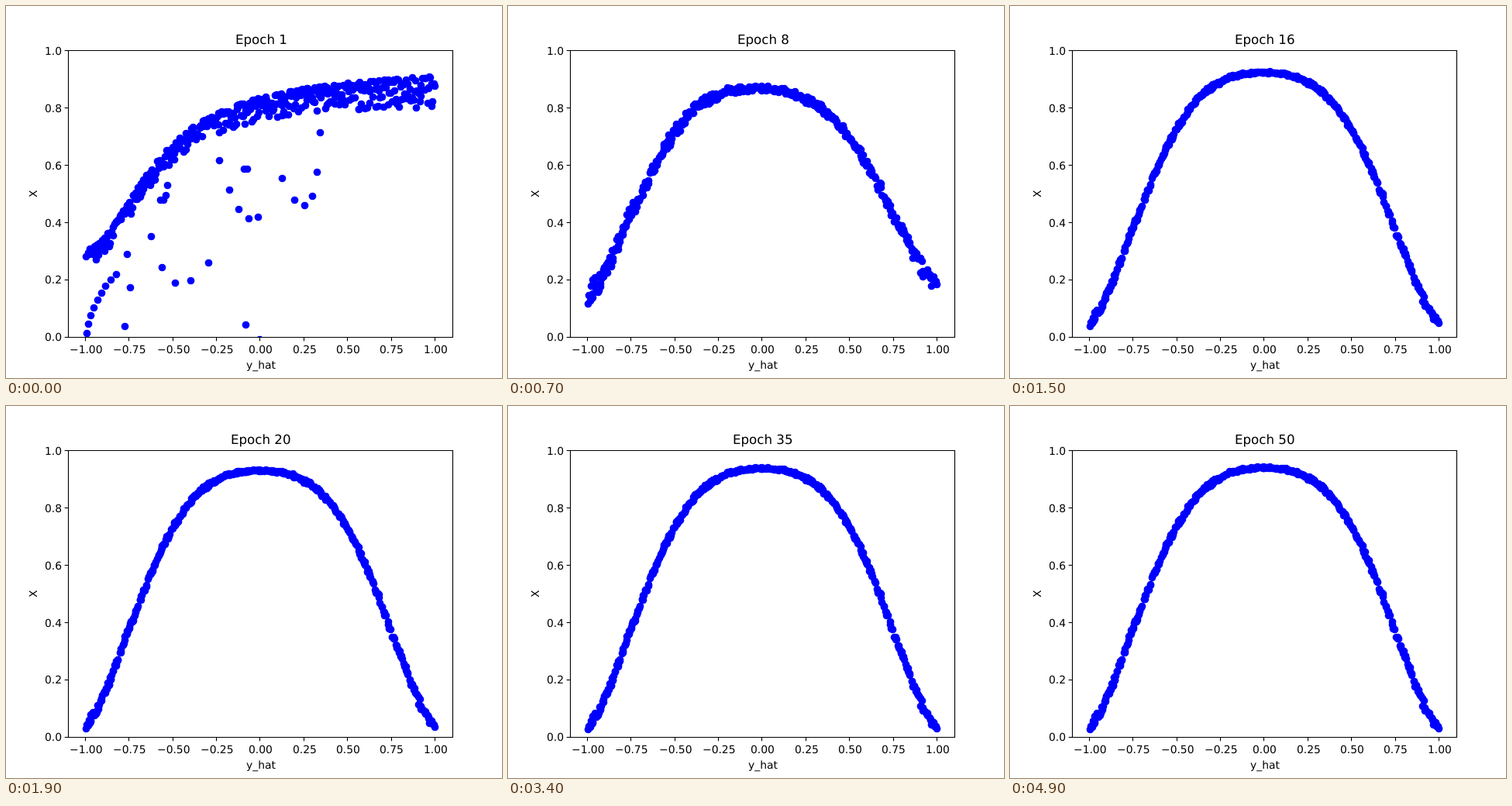
Write an HTML page that moves like this. It is 640 by 480 pixels and loops after 5 s.

```html
<!DOCTYPE html>
<html lang="en">
<head>
<meta charset="utf-8">
<title>Training epochs</title>
<style>
html, body { margin: 0; width: 100%; height: 100%; overflow: hidden; background: #fff; }
svg { display: block; width: 640px; height: 480px; }
text {
  font-family: "DejaVu Sans", sans-serif; font-size: 13.89px; fill: #000;
  text-rendering: geometricPrecision;
}
#title { font-size: 16.67px; }
#axes { stroke: #000; stroke-width: 1.11; fill: none; }
</style>
</head>
<body>
<svg viewBox="0 0 640 480">
  <clipPath id="plot"><rect x="80" y="57.6" width="496" height="369.6"/></clipPath>
  <rect width="640" height="480" fill="#fff"/>
  <g id="dots" fill="#00f" clip-path="url(#plot)"></g>
  <g id="axes"><path d="M80.5 57.5H576.5V427.5H80.5Z"/></g>
  <g id="labels"><text transform="translate(40 247) rotate(-90)">X</text></g>
  <text id="title" y="49"></text>
</svg>
<script>
const EPOCHS = 50, STEP = 100, COUNT = 400;
const byId = id => document.getElementById(id);
const toX = x => 327.8 + 225.6 * x;
const toY = v => 427.2 - 369.6 * v;
const fromX = px => (px - 327.8) / 225.6;
const fromY = py => (427.2 - py) / 369.6;
const snap = v => Math.floor(v) + .5;
const mix = (a, b, t) => a + (b - a) * t;

let seed = 20731;
function random() {
  seed = (seed * 1664525 + 1013904223) % 4294967296;
  return seed / 4294967296;
}

// The fit goes from a saturating ramp over a lopsided hill to a bell
const ramp = x => .88 - .6 / (1 + ((x + 1) / .41) ** 2);

function hill(x) {
  const d = x + .1;
  return .765 / (1 + (d < 0 ? (-d / .82) ** 3.2 : (d / 1.36) ** 2));
}

const bell = x => Math.cos(Math.PI / 2 * (.35 * Math.abs(x) + .54 * x * x)) ** 2;

const warmUp = epoch => Math.min((epoch - 1) / 3, 1);
const settle = epoch => 1 - Math.exp(-.26 * Math.max(epoch - 4, 0));

function curve(x, epoch) {
  const early = mix(ramp(x), hill(x), warmUp(epoch));
  const height = .942 - .02 * Math.exp((4 - epoch) / 22);
  return mix(early, height * bell(x), settle(epoch));
}

function spread(x, epoch) {
  const early = mix(.08 + .03 * x, .045 - .03 * x + .09 * x * x, warmUp(epoch));
  return mix(early, .005 + .018 * Math.abs(x), Math.min(1, settle(epoch) * 1.12));
}

function add(parent, name, attrs) {
  const el = document.createElementNS("http://www.w3.org/2000/svg", name);
  for (const key in attrs) el.setAttribute(key, attrs[key]);
  return byId(parent).appendChild(el);
}

const dots = [];
function addDot(x, skewed, even, offset) {
  const el = add("dots", "circle", { cx: snap(toX(x)), r: 4.86 });
  dots.push({ el, x, skewed, even, offset });
}

for (let i = 0; i < COUNT; i++) {
  const x = Math.min(1, -.995 + 1.995 * (i + 2 * random()) / COUNT);
  addDot(x, .5 - random() ** 1.6, (random() + random() - 1) * .8, 0);
}

// Stray dots start along short arcs: start, control and end point, count
const ARCS = [
  [104, 422, 112, 375, 142, 346, 9],
  [156, 320, 166, 360, 153, 413, 3],
  [187, 297, 212, 400, 261, 331, 5],
  [275, 199, 300, 290, 325, 272, 5],
  [356, 223, 400, 315, 405, 163, 6],
  [199, 250, 206, 255, 208, 232, 4],
  [307, 210, 309, 210, 311, 210, 2],
  [309, 411, 318, 420, 327, 430, 2]
];
const bezier = (a, b, c, t) => mix(mix(a, b, t), mix(b, c, t), t);
for (const [x0, y0, x1, y1, x2, y2, count] of ARCS) {
  for (let i = 0; i < count; i++) {
    const t = i / (count - 1);
    const x = fromX(bezier(x0, x1, x2, t) + .5);
    addDot(x, 0, random() - .5, fromY(bezier(y0, y1, y2, t)) - curve(x, 1));
  }
}

// Puts a text on whole pixels; align is 0.5 for centred, 1 for flush right
function place(el, x, align, text, size = 13.89) {
  el.textContent = text;
  const inkWidth = el.getComputedTextLength() - .133 * size;
  el.setAttribute("x", Math.round(x - align * inkWidth));
}

for (let i = -4; i <= 4; i++) {
  const px = toX(i / 4);
  add("axes", "path", { d: `M${snap(px)} 427.5v4.86` });
  const sign = i < 0 ? "\u2212" : "";
  place(add("labels", "text", { y: 448 }), px, .5, sign + Math.abs(i / 4).toFixed(2));
}
for (let i = 0; i <= 5; i++) {
  const py = toY(i / 5);
  add("axes", "path", { d: `M80.5 ${snap(py)}h-4.86` });
  place(add("labels", "text", { y: Math.round(py + 5.2) }), 70.3, 1, (i / 5).toFixed(1));
}
place(add("labels", "text", { y: 468 }), 328, .5, "y_hat");

let shown = 0;
function draw(epoch) {
  const decay = Math.exp(.9 * (1 - epoch));
  for (const { el, x, skewed, even, offset } of dots) {
    const noise = mix(skewed, even, warmUp(epoch));
    const v = curve(x, epoch) + noise * spread(x, epoch) + offset * decay;
    el.setAttribute("cy", snap(toY(v)));
  }
  place(byId("title"), 328, .5, "Epoch " + epoch, 16.67);
  shown = epoch;
}

function tick() {
  const epoch = Math.floor(performance.now() / STEP) % EPOCHS + 1;
  if (epoch !== shown) draw(epoch);
  requestAnimationFrame(tick);
}
tick();
</script>
</body>
</html>
```
